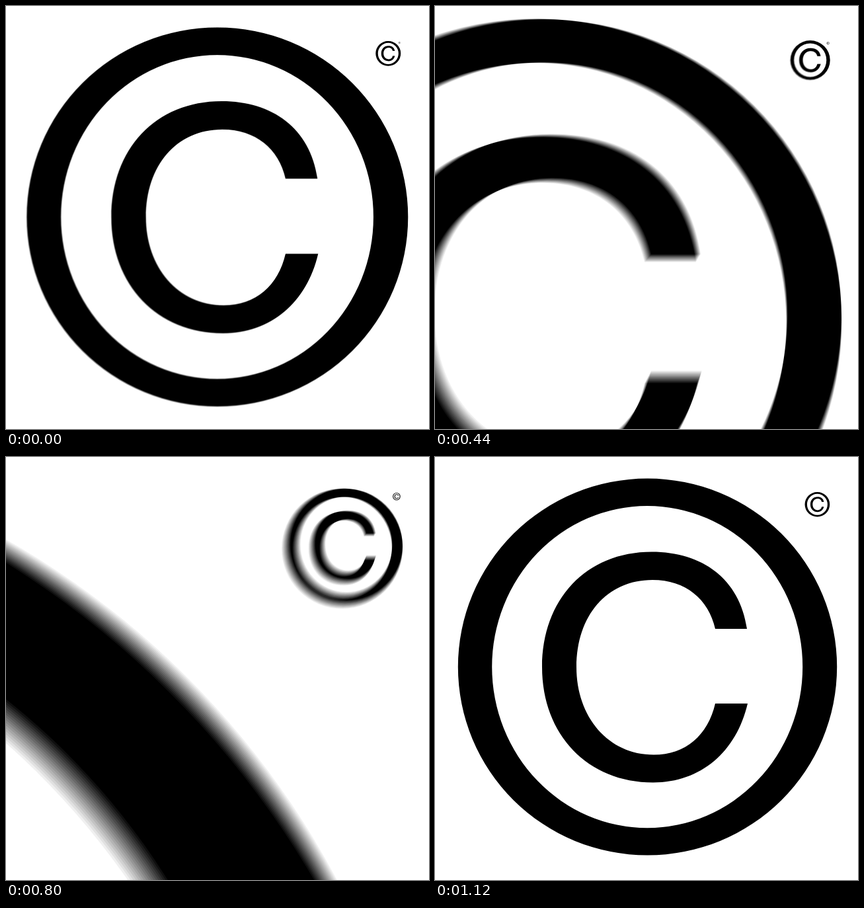
Animation of 640 by 640 pixels, one loop 1.92 s. Source, as an HTML page with a canvas:

```html
<!DOCTYPE html>
<html lang="en">
<head>
<meta charset="utf-8">
<title>Endless zoom</title>
<style>
  html, body { margin: 0; width: 100%; height: 100%; overflow: hidden; background: #fff; }
  canvas { display: block; width: 100vw; height: 100vh; }
</style>
</head>
<body>
<canvas id="stage" width="640" height="640"></canvas>
<script>
const ctx = document.getElementById('stage').getContext('2d');

const LOOP = 1920, STEP = 40, LAST = 28;
const RATIO = 15.2;              // size of one sign against the sign nested in it
const PX = 596.5, PY = 54.4;     // fixed point of the zoom
const SAMPLES = 17;              // divides 255, so the layers add up to full black
const SHUTTER = 0.5;

// [step, log of scale, speed per step]
const KEYS = [
  [0, 0.006, 0.008],
  [4, 0.0816, 0.0315],
  [8, 0.2593, 0.058],
  [15, 0.8364, 0.108],
  [20, 1.541, 0.166],
  [24, 2.337, 0.193],
  [LAST, Math.log(RATIO), 0]
];

function logScale(x) {
  if (x <= 0) return Math.max(0, KEYS[0][1] + x * KEYS[0][2]);
  if (x >= LAST) return KEYS[KEYS.length - 1][1];
  let i = 0;
  while (x > KEYS[i + 1][0]) i++;
  const [x0, y0, v0] = KEYS[i], [x1, y1, v1] = KEYS[i + 1];
  const h = x1 - x0, u = (x - x0) / h, w = 1 - u;
  return w * w * ((1 + 2 * u) * y0 + u * h * v0) + u * u * ((1 + 2 * w) * y1 - w * h * v1);
}

const ring = new Path2D();
ring.ellipse(321.5, 317.6, 286.7, 285, 0, 0, 2 * Math.PI);
ring.closePath();
ring.moveTo(556.2, 317.6);
ring.ellipse(321.2, 317.6, 235, 243.6, 0, 0, 2 * Math.PI);
ring.closePath();

const letter = new Path2D(
  'M472 260C461 184 404 143.5 328 143.5C228 143.5 162 216 162 318' +
  'C162 420 231 492.5 330 492.5C402 492.5 456 446 473 373' +
  'L424 373C413 421 379 450.5 331 450.5C262 450.5 214 393 214 318' +
  'C214 240 260 186 329 186C379 186 414 215 424 260Z'
);

function drawSigns(scale) {
  for (let level = 0; level < 3; level++) {
    const s = scale / RATIO ** level;
    ctx.setTransform(s, 0, 0, s, PX * (1 - s), PY * (1 - s));
    ctx.fill(ring, 'evenodd');
    ctx.fill(letter);
  }
}

function render(step) {
  ctx.setTransform(1, 0, 0, 1, 0, 0);
  ctx.clearRect(0, 0, 640, 640);
  ctx.fillStyle = '#000';
  ctx.globalCompositeOperation = 'lighter';
  const count = step === LAST ? 1 : SAMPLES;
  ctx.globalAlpha = 1 / count;
  for (let i = 0; i < count; i++) {
    const shift = ((i + 0.5) / count - 0.5) * SHUTTER;
    drawSigns(Math.exp(logScale(step + shift)));
  }
}

let shown = -1;
function tick() {
  const step = Math.min(LAST, Math.floor((performance.now() % LOOP) / STEP));
  if (step !== shown) render(shown = step);
  requestAnimationFrame(tick);
}
tick();
</script>
</body>
</html>
```
